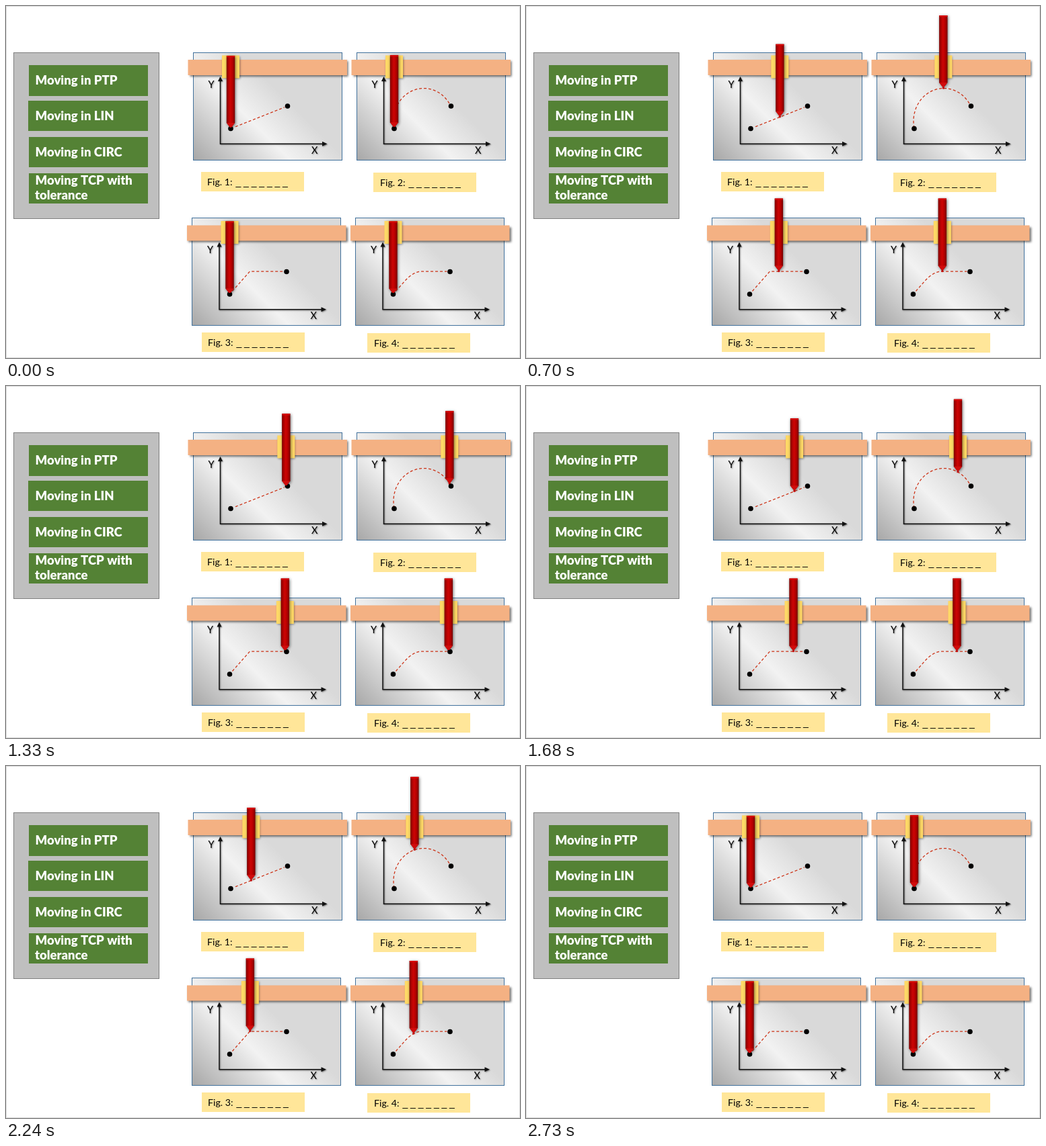
Write an HTML page with a canvas that moves like this. It is 764x524 px and loops after 2800 ms.

```html
<!DOCTYPE html>
<html lang="en">
<head>
<meta charset="utf-8">
<title>Robot motion types</title>
<style>
html, body { margin: 0; width: 100%; height: 100%; overflow: hidden; background: #fff; }
canvas { display: block; }
</style>
</head>
<body>
<canvas id="stage" width="764" height="524"></canvas>
<script>
const ctx = document.getElementById('stage').getContext('2d');
const STEP = 70, STEPS = 40, REACH = 84.5;
const START = { x: 334, y: 182.5 }, END = { x: 418.5, y: 149 };
const OVAL = { d: 44, y: 171.4, rx: 45, ry: 48.9 };
const SLOPE = 34 / 30;

// Height of each path at distance d to the right of the start point.
const line = d => START.y - d * 33.5 / REACH;
const corner = d => Math.max(148.5, START.y - d * SLOPE);
const blend = d => {
  if (d < 17) return START.y - d * SLOPE;
  return d < 43 ? 148.5 + SLOPE * (43 - d) ** 2 / 52 : 148.5;
};
// The arc starts on the lower half of its oval and swings round to the upper one.
const arc = d => {
  const h = OVAL.ry * Math.sqrt(1 - ((d - OVAL.d) / OVAL.rx) ** 2);
  return d < .5 ? OVAL.y + h : OVAL.y - h;
};

const figures = [
  { dx: 0, dy: 0, path: line, from: 7, to: 80, box: [290, 247], label: [299, 267] },
  { dx: 243, dy: 0, path: arc, box: [546, 248], label: [556, 268] },
  { dx: -1.5, dy: 246.5, path: corner, from: 4, to: 80, box: [291, 486], label: [300, 506] },
  { dx: 241.5, dy: 246.5, path: blend, from: 4, to: 80, box: [537, 487], label: [547, 507] }
];

const buttons = [
  [34, 88, 46, 'Moving in PTP'],
  [33, 141, 45, 'Moving in LIN'],
  [34, 195, 45, 'Moving in CIRC'],
  [34, 249, 45, 'Moving TCP with', 'tolerance']
];

function shadow(alpha, blur, x, y) {
  ctx.shadowColor = `rgba(0,0,0,${alpha})`;
  ctx.shadowBlur = blur;
  ctx.shadowOffsetX = x;
  ctx.shadowOffsetY = y;
}

function rect(x, y, w, h, fill, stroke) {
  ctx.fillStyle = fill;
  ctx.fillRect(x, y, w, h);
  if (!stroke) return;
  ctx.strokeStyle = stroke;
  ctx.lineWidth = 1;
  ctx.strokeRect(x + .5, y + .5, w - 1, h - 1);
}

function text(str, x, y, size, color, family = 'Lato') {
  ctx.font = `${size} "${family}", sans-serif`;
  ctx.fillStyle = color;
  ctx.fillText(str, x, y);
}

function dot(x, y, r, color) {
  ctx.fillStyle = color;
  ctx.beginPath();
  ctx.arc(x, y, r, 0, 7);
  ctx.fill();
}

function poly(points, fill) {
  ctx.fillStyle = fill;
  ctx.beginPath();
  points.forEach(p => ctx.lineTo(...p));
  ctx.fill();
}

function gradient(x0, y0, x1, y1, stops) {
  const g = ctx.createLinearGradient(x0, y0, x1, y1);
  stops.forEach(([at, color]) => g.addColorStop(at, color));
  return g;
}

function drawMenu() {
  rect(11, 69, 217, 248, '#bfbfbf', '#7f7f7f');
  for (const [x, y, h, first, second] of buttons) {
    rect(x, y, 211 - x, h, '#548235');
    text(first, 43.5, second ? 266 : y + 28.5, '900 18.5px', '#fff');
    if (second) text(second, 43, 288, '900 18.5px', '#fff');
  }
}

function drawPanel() {
  // Square diagonal across the 222 x 161 plate.
  const fill = gradient(278, 230, 469.5, 38.5, [
    [0, '#a6a6a6'], [.38, '#f2f2f2'], [.6, '#d9d9d9'], [1, '#d9d9d9']
  ]);
  rect(278, 69, 222, 161, fill, '#41719c');
}

function drawAxes() {
  shadow(.45, 2, 1, 1);
  ctx.strokeStyle = '#111';
  ctx.lineWidth = 1.5;
  ctx.beginPath();
  ctx.moveTo(318.5, 111);
  ctx.lineTo(318.5, 205.3);
  ctx.lineTo(471, 205.3);
  ctx.stroke();
  poly([[318.5, 105], [322, 112], [315, 112]], '#111');
  poly([[477.5, 205.3], [470, 201.8], [470, 208.8]], '#111');
  text('Y', 300.5, 121.5, '14.5px', '#000');
  text('X', 454, 219.5, '14.5px', '#000');
  shadow(0, 0, 0, 0);
}

function drawPath(fig) {
  ctx.strokeStyle = '#cc3014';
  ctx.lineWidth = 1.25;
  ctx.setLineDash([4, 3]);
  ctx.beginPath();
  if (fig.path === arc) {
    ctx.ellipse(START.x + OVAL.d, OVAL.y, OVAL.rx, OVAL.ry, 0, Math.PI - .21, 2 * Math.PI - .48);
  } else {
    for (let d = fig.from; d <= fig.to; d += .5) ctx.lineTo(START.x + d, fig.path(d));
  }
  ctx.stroke();
  ctx.setLineDash([]);
}

function drawTool(x, tip) {
  shadow(.4, 3, 1, 1);
  rect(x - 13, 73.5, 26, 34, '#ffd966');
  const top = tip - 108.5, neck = tip - 8.5, nose = tip - 2;
  const red = gradient(x - 6.3, 0, x + 6.3, 0, [
    [0, '#7a0000'], [.2, '#a80000'], [.45, '#cc0505'], [.7, '#b80000'], [1, '#760000']
  ]);
  shadow(.55, 4, 1, 1);
  poly([
    [x - 6.2, top], [x + 6.2, top], [x + 6.2, neck],
    [x + 1.2, nose], [x - 1.2, nose], [x - 6.2, neck]
  ], red);
  shadow(0, 0, 0, 0);
  rect(x - 6, top, 12, 2, '#d80808');
  poly([[x - 6, neck], [x + 6, neck], [x + 1.2, nose], [x - 1.2, nose]], '#d00c0c');
}

function drawCaption(fig, number) {
  const [x, y] = fig.label;
  rect(...fig.box, 153, 29, '#ffe699');
  text(`Fig. ${number}:`, x, y, '14.2px', '#000');
  for (let i = 0; i < 7; i++) text('_', x + 42.5 + i * 11.6, y, '14px', '#000', 'Liberation Sans');
}

function drawFigure(fig, d, number) {
  const x = START.x + d, y = fig.path(d);
  ctx.save();
  ctx.translate(Math.floor(fig.dx), Math.floor(fig.dy));
  drawPanel();
  ctx.restore();
  ctx.save();
  ctx.translate(fig.dx, fig.dy);
  drawAxes();
  drawPath(fig);
  dot(x, y - .5, 1.7, '#e01010');
  dot(START.x, START.y, 3.8, '#000');
  dot(END.x, END.y, 3.8, '#000');
  shadow(.55, 3, 2, 2);
  rect(270.5, 80, 236.5, 23, '#f4b183');
  shadow(0, 0, 0, 0);
  drawTool(x, y);
  ctx.restore();
  drawCaption(fig, number);
}

function draw(now) {
  const step = Math.floor(now / STEP) % STEPS;
  const d = Math.min(step, STEPS - 1 - step) * REACH / 19.5;
  rect(0, 0, 764, 524, '#fff', '#d9d9d9');
  drawMenu();
  figures.forEach((fig, i) => drawFigure(fig, d, i + 1));
}

const begin = performance.now();
function tick() {
  draw(performance.now() - begin);
  requestAnimationFrame(tick);
}
tick();
</script>
</body>
</html>
```
